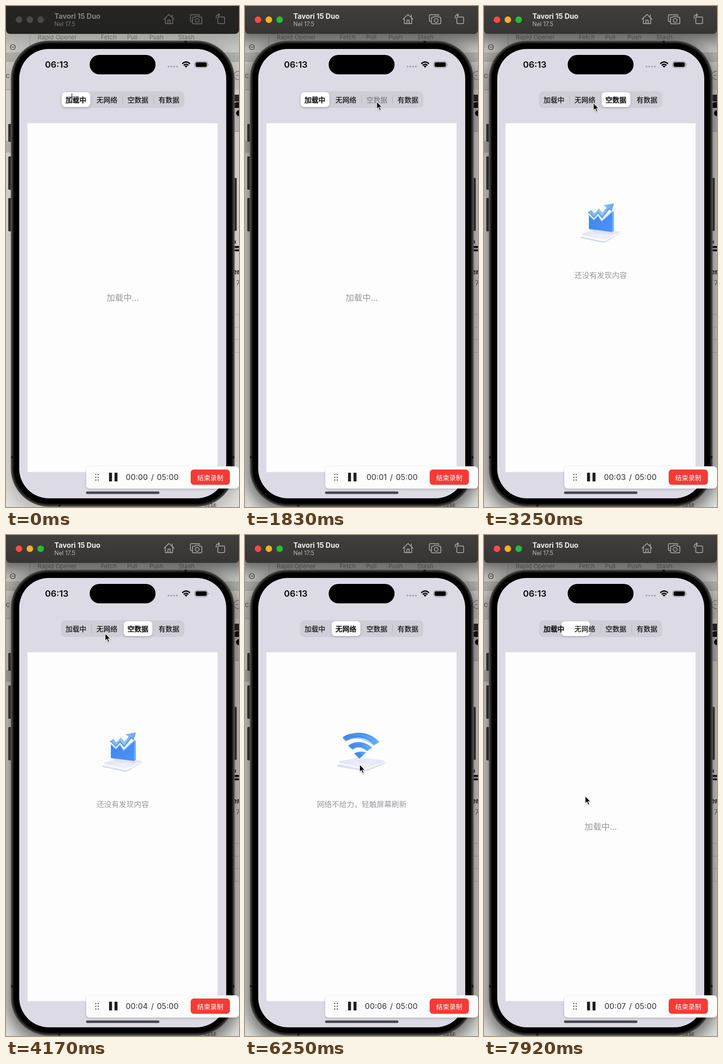
An HTML page that plays this animation: 511 by 1096 pixels, repeating every 8000 ms.

```html
<!DOCTYPE html>
<html lang="zh-CN">
<head>
<meta charset="utf-8">
<title>Empty state demo</title>
<style>
html, body { margin: 0; width: 511px; height: 1096px; overflow: hidden; background: #d8d8d5; }
svg { display: block; font-family: Inter, "Noto Sans CJK SC", "Noto Sans CJK", sans-serif; }
.cjk { font-family: "Noto Sans CJK SC", "Noto Sans CJK", sans-serif; }
.mid { text-anchor: middle; }
.end { text-anchor: end; }
.hint { fill: #98989b; font-size: 16.4px; }
.line { fill: none; stroke-linecap: round; stroke-linejoin: round; }

#stage { --bar1: #262523; --bar2: #21211f; --ink: #858482; --sub: #777674; --r: #4a4947; --y: #4a4947; --g: #4a4947; --shade: .2; }
#stage.active { --bar1: #403f3e; --bar2: #363534; --ink: #f0f0ef; --sub: #b9b8b7; --r: #fc4b47; --y: #fdb024; --g: #25be32; --shade: .52; }
#stage:not(.active) #arrow, #stage.active #cross { display: none; }
#shade { opacity: var(--shade); }
#icons { stroke: var(--sub); stroke-width: 1.5; }
#labels text { font-size: 15.2px; fill: #0a0a0c; stroke: #0a0a0c; stroke-width: .2px; }
#labels text.on { stroke-width: .65px; }
#labels text.down { opacity: .4; }
</style>
</head>
<body>
<svg id="stage" width="511" height="1096" viewBox="0 0 511 1096">
<defs>
  <linearGradient id="barFill" x2="0" y2="1">
    <stop style="stop-color:var(--bar1)"/><stop offset="1" style="stop-color:var(--bar2)"/>
  </linearGradient>
  <linearGradient id="blue" x2="1" y2="1"><stop stop-color="#3c83ef"/><stop offset="1" stop-color="#4f94f6"/></linearGradient>
  <linearGradient id="sky" x2="1"><stop stop-color="#79b4ee"/><stop offset=".5" stop-color="#94c4f1"/><stop offset="1" stop-color="#68a5e8"/></linearGradient>
  <linearGradient id="wave" x2="1"><stop stop-color="#4386e4"/><stop offset=".55" stop-color="#4a91ea"/><stop offset="1" stop-color="#66b2f8"/></linearGradient>
  <linearGradient id="plate" x2="1"><stop stop-color="#dfe2f3"/><stop offset=".5" stop-color="#eff0f9"/><stop offset="1" stop-color="#e2e4f4"/></linearGradient>
  <filter id="soft" x="-30%" y="-30%" width="160%" height="160%"><feGaussianBlur stdDeviation="17"/></filter>
  <filter id="drop" x="-20%" y="-40%" width="140%" height="190%"><feDropShadow dx="0" dy="2" stdDeviation="2.5" flood-opacity=".2"/></filter>
  <filter id="tiny" x="-40%" y="-40%" width="190%" height="190%"><feDropShadow dx="0" dy="1" stdDeviation="1" flood-opacity=".35"/></filter>
</defs>

<!-- windows behind the simulator -->
<g id="behind">
  <rect width="511" height="1096" fill="#e2e2df"/>
  <rect width="511" height="102" fill="#cbcbc7"/>
  <rect y="102" width="511" height="19" fill="#b2b2ae"/>
  <rect y="121" width="511" height="62" fill="#d0d0cc"/>
  <path d="M0 102.5H511M0 121.5H511M52.5 61V102M0 183.5H12" stroke="#a5a5a1"/>
  <rect y="295" width="12" height="26" fill="#c0c0bf"/>
  <g fill="#7b7b78" font-size="13.3">
    <text x="69.500" y="73">Rapid Opener</text><text x="208" y="73">Fetch</text>
    <text x="265.500" y="73">Pull</text><text x="314.500" y="73">Push</text><text x="378" y="73">Stash</text>
  </g>
  <text x="-1" y="158" font-size="17" font-weight="700" fill="#8b8b88">c</text>
  <circle cx="15" cy="90" r="5.500" fill="none" stroke="#222" stroke-width="1.200"/>
  <path d="M12.500 90H18" stroke="#222" stroke-width="1.500" stroke-dasharray="1.400 .7"/>
  <circle cx="509" cy="152" r="9" fill="none" stroke="#777" stroke-width="1.300"/>
  <path d="M504 152H511" stroke="#777" stroke-width="2" stroke-dasharray="2 1.500"/>
  <rect x="499" y="194" width="12" height="15" fill="#2b2b2a"/>
  <path d="M499 214Q502 210 511 210V223H499Z" fill="#161616"/>
  <rect x="499" y="223" width="12" height="51" fill="#c4c4ca"/>
  <circle cx="511" cy="234.500" r="6.500" fill="#000"/>
  <path d="M499 274.500H511" stroke="#999"/>
  <path d="M499 530H511" stroke="#a5a1c4" stroke-width="2"/>
  <path d="M499 527H511M499 534.500H511" stroke="#111" stroke-width="4"/>
  <path d="M503 513V520" stroke="#222" stroke-width="2"/>
  <text x="497" y="587" font-size="16" font-weight="700" fill="#222">er</text>
  <text x="505" y="611" font-size="14" fill="#555">7</text>
  <path d="M499 674.500H511M499 702.500H511M499 729.500H511M499 757.500H511" stroke="#b9b9b7"/>
  <text class="cjk" x="435" y="1099" font-size="13.500" fill="#555">跳转</text>
</g>
<g id="shade" filter="url(#soft)">
  <rect x="4" y="88" width="504" height="1020" rx="80"/>
  <rect x="-20" y="5" width="551" height="72"/>
</g>

<!-- phone -->
<g fill="#2d2c2a">
  <rect x="5" y="258" width="8" height="39" rx="2"/><rect x="5" y="329" width="8" height="73" rx="2"/>
  <rect x="5" y="420" width="8" height="73" rx="2"/><rect x="499" y="376" width="7" height="116" rx="2"/>
</g>
<rect x="11" y="76" width="490" height="1019" rx="83" fill="#393834" stroke="#6b6a65"/>
<rect x="13.500" y="78.500" width="485" height="1014" rx="80.500" fill="#1d1c1a" stroke="#4b4a46"/>
<path d="M394 76V82M117 1089V1095M11 987H17M495 987H501" stroke="#171614" stroke-width="5"/>
<rect x="17" y="82" width="478" height="1007" rx="77" fill="#000"/>
<rect x="29" y="94" width="454" height="983" rx="65" fill="#dcdbe5"/>
<text x="85.500" y="134.500" font-size="19.300" font-weight="600" fill="#050506">06:13</text>
<rect x="183.500" y="107" width="144.500" height="42.500" rx="21.250"/>
<path d="M356.500 132.500H376" class="line" stroke="#a5a4ae" stroke-width="4" stroke-dasharray="0 6.100"/>
<g class="line" stroke="#000" stroke-width="2.700" stroke-linecap="butt" style="stroke-linecap:butt">
  <path d="M386.500 126.500Q395 118.300 403.500 126.500M389.700 129.900Q395 124.900 400.300 129.900"/>
</g>
<path d="M391.600 131.600Q395 128.800 398.400 131.600L395 135Z"/>
<rect x="414" y="121.500" width="28" height="13.500" rx="4.500" fill="none" stroke="#85848d" stroke-width="1.200"/>
<rect x="415.800" y="123.200" width="24.500" height="10" rx="3"/>
<path d="M443.500 126Q446 128.200 443.500 130.500Z" fill="#85848d"/>

<!-- segmented control -->
<rect x="120.500" y="186.500" width="270.500" height="36.500" rx="9.500" fill="#cfced6"/>
<g id="seps" fill="#b5b4bd"></g>
<rect id="pill" x="122" y="188.500" width="63" height="32.500" rx="8" fill="#fff" filter="url(#drop)"/>
<g id="labels" class="cjk mid"></g>

<!-- content -->
<rect x="47" y="256.500" width="417" height="763" fill="#fdfdfe"/>
<g id="loading"><text class="cjk mid hint" x="256" y="645" style="font-size:18.5px">加载中...</text></g>
<g id="empty">
  <path d="M212 505L250 494 300 497 268 516Q264 518.500 258 517.500L214 508Q211 507 212 505Z" fill="#d6daee"/>
  <path d="M212 504L250 493 300 496 268 513.500Q264 515.500 258 514.500Z" fill="#f8f8fd"/>
  <path d="M216 498L252 487 299 494 269 508.500Q264 510.500 258 509.500L217 501Q214 500 216 498Z" fill="url(#plate)"/>
  <path d="M231 489L284 494.500V499L246 498Z" fill="#d5ddf6" opacity=".65"/>
  <path d="M230 457L241 467 250 458 258 470 281 449 284.500 450V492L281 494.500 230 488Z" fill="url(#blue)"/>
  <path d="M281 449.500L284.500 450V491.500L281 494Z" fill="#73aef6"/>
  <path d="M230 458L241 468 250 459 258 471 281 450.500" class="line" stroke="#a1cbfa" stroke-width="1.500"/>
  <path d="M229 451L235 446 242 454 252 443 260 452 269 441 262 436 285 432 280 449 275 445 259 466 250 455 241 465Z" fill="url(#sky)"/>
  <path d="M229 451L241 462 250 451.500 259 462 274 443.500 280 447" class="line" stroke="#5b9ee5" stroke-width="2"/>
  <path d="M236 446L242 454 252 443.500 260 452 269 441 262 436 284 432" class="line" stroke="#b4daf6"/>
  <text class="cjk mid hint" x="256" y="595">还没有发现内容</text>
</g>
<g id="offline">
  <path d="M202 503L250 493 310 499 271 515Q264 518 257 516L204 507Q201 505 202 503Z" fill="#dcdfef"/>
  <path d="M204 501L252 491 310 496 270 511.500Q264 514 256 512Z" fill="#fafafe"/>
  <path d="M208 494.500L252 486.500 304 493Q308 494 304 496.500L270 508.500Q264 511 257 509.500L208 498.500Q204 496 208 494.500Z" fill="url(#plate)"/>
  <path d="M239 487L252 491 266 488 274 496 250 501Z" fill="#dce2f6" opacity=".55"/>
  <path d="M214 443Q224 434 248 432.500 276 432 294.500 453L283 460Q269 444 249 443.500 232 443.500 222 451Z" fill="url(#wave)"/>
  <path d="M226.500 461Q237 452 251 453 267 454 279 465.500L267.500 472.500Q259 464 249 464 241 464.500 236 469.500Z" fill="url(#wave)"/>
  <path d="M239.500 478Q251 471 266 475.500L251 489.500Z" fill="url(#wave)"/>
  <path d="M215 446L222 451Q249 434 283 460M228 463L236 469.500Q250 458 267.500 472.500" class="line" stroke="#8bc5fa" stroke-width="1.500"/>
  <path d="M232 436.500Q265 432 288 456M238 456Q259 453 273 468M244 476Q253 473 260 479" class="line" stroke="#82bdf5" opacity=".6"/>
  <text class="cjk mid hint" x="256" y="595">网络不给力，轻触屏幕刷新</text>
</g>

<rect x="175.500" y="1062" width="161" height="5.500" rx="2.750" fill="#48474e"/>

<!-- recorder -->
<rect x="176" y="1007" width="335" height="48.500" rx="8" fill="#fcfcfd" filter="url(#drop)"/>
<path d="M197 1025V1038M202.200 1025V1038" class="line" stroke="#3a3b40" stroke-width="2.600" stroke-dasharray="0 6"/>
<path d="M226 1021H232.500V1040H226ZM238 1021H244.500V1040H238Z" fill="#1d1e24"/>
<g font-size="16.800" font-weight="500" fill="#4b4c52">
  <text id="clock" class="end" x="311" y="1037">00:00</text>
  <text class="mid" x="321" y="1037">/</text>
  <text class="end" x="378.500" y="1037">05:00</text>
</g>
<rect x="405" y="1014" width="86" height="33.500" rx="7" fill="#f53b36"/>
<text class="cjk mid" x="448" y="1036.500" font-size="14.200" font-weight="500" fill="#fff">结束录制</text>

<!-- title bar -->
<path d="M0 0H511V51Q511 61 501 61H10Q0 61 0 51Z" fill="url(#barFill)"/>
<circle cx="28.500" cy="30" r="7.200" style="fill:var(--r)"/>
<circle cx="52.300" cy="30" r="7.200" style="fill:var(--y)"/>
<circle cx="76" cy="30" r="7.200" style="fill:var(--g)"/>
<text x="106" y="27.500" font-size="15.500" font-weight="700" style="fill:var(--ink)">Tavori 15 Duo</text>
<text x="106" y="44" font-size="12.800" style="fill:var(--sub)">Nel 17.5</text>
<g id="icons" class="line">
  <path d="M346.500 29L357.500 18.500 368.500 29M349.500 27V38.500H365.500V27M355 38V31H360V38M364.500 24V19.500"/>
  <path d="M408 34H406.500Q404.500 34 404.500 32V21Q404.500 19 406.500 19H423Q425 19 425 21"/>
  <path d="M411.500 24.500H414L416 22.500H423L425 24.500H427Q429.500 24.500 429.500 27V36.500Q429.500 39 427 39H411.500Q409 39 409 36.500V27Q409 24.500 411.500 24.500Z"/>
  <circle cx="419.300" cy="31.500" r="4.200"/>
  <path d="M466.500 24H477.500Q479.500 24 479.500 26V36.500Q479.500 38.500 477.500 38.500H466.500Q464.500 38.500 464.500 36.500V26Q464.500 24 466.500 24ZM461 27V24.500Q461 19.500 466 19.500H468.500M465.800 17L468.500 19.500 465.800 22"/>
</g>

<!-- pointers -->
<g id="cross">
  <path d="M-8 0H8M0 -8V8" stroke="#fff" stroke-width="2.500" opacity=".7"/>
  <path d="M-8 0H8M0 -8V12" stroke="#111" stroke-width="1.200"/>
</g>
<path id="arrow" d="M0 0V16.500L3.800 13 6.400 19.500 9.300 18.200 6.600 12H11.700Z" stroke="#fff" stroke-width="1.200" filter="url(#tiny)"/>
</svg>

<script>
const LOOP = 8000, TICK = 1000 / 12;
const $ = id => document.getElementById(id);
const SVG = "http://www.w3.org/2000/svg";
const add = (parent, tag, attrs, text = "") => {
  const el = document.createElementNS(SVG, tag);
  for (const k in attrs) el.setAttribute(k, attrs[k]);
  el.textContent = text;
  parent.append(el);
  return el;
};

const labels = ["加载中", "无网络", "空数据", "有数据"].map((s, i) =>
  add($("labels"), "text", { x: 153.3 + 68 * i, y: 210.5 }, s));
const seps = [0, 1, 2].map(i =>
  add($("seps"), "rect", { x: 187.3 + 68 * i, y: 196, width: 1.2, height: 18.5 }));

// All times below are counted in ticks of a twelfth of a second.
const seconds = [14, 26, 39, 50, 62, 75, 86];
const taps = [
  { at: 24, from: 0, to: 2, press: 22 },
  { at: 56, from: 2, to: 1, press: 54 },
  { at: 95, from: 1, to: 0, press: 95 }
];
const views = ["loading", "offline", "empty"];
const path = [
  [22, 289, 209], [39, 240, 212], [40, 217.5, 215],
  [64, 258, 338], [65, 286, 441], [68, 265, 480], [69, 251.5, 502],
  [76, 238, 538], [77, 222, 572], [78, 217, 582], [83, 222, 571]
];

const last = (list, test) => list.filter(test).pop();
const move = (el, x, y) => el.setAttribute("transform", `translate(${x} ${y})`);
const spring = w => 1 - (1 + w) * Math.exp(-w);

function draw(time) {
  const n = Math.floor((time + 4) / TICK);
  $("stage").classList.toggle("active", n >= 22);

  const u = Math.min(1, Math.max(0, (n - 10) / 9));
  const e = u * u * (3 - 2 * u);
  move($("cross"), 144.5 + 144.5 * e, 199 + 12 * e);
  const [, x, y] = last(path, p => p[0] <= n) || path[0];
  move($("arrow"), x, y);

  const tap = last(taps, s => s.at <= n) || { at: -20, from: 0, to: 0 };
  const p = spring(1.1 + 1.61 * (n - tap.at));
  move($("pill"), 68 * (tap.from + (tap.to - tap.from) * p), 0);
  const gap = (i, sel) => i === sel || i === sel - 1 ? 0 : 1;
  seps.forEach((el, i) =>
    el.setAttribute("opacity", gap(i, tap.from) * (1 - p) + gap(i, tap.to) * p));

  const held = taps.find(s => n >= s.press && n < s.at);
  labels.forEach((el, i) => {
    el.classList.toggle("on", i === tap.to);
    el.classList.toggle("down", !!held && held.to === i);
  });
  views.forEach((id, i) => $(id).style.display = i === tap.to ? "" : "none");
  $("clock").textContent = "00:0" + seconds.filter(s => s <= n).length;
}

const start = performance.now();
function frame() {
  draw((performance.now() - start) % LOOP);
  requestAnimationFrame(frame);
}
frame();
</script>
</body>
</html>
```
